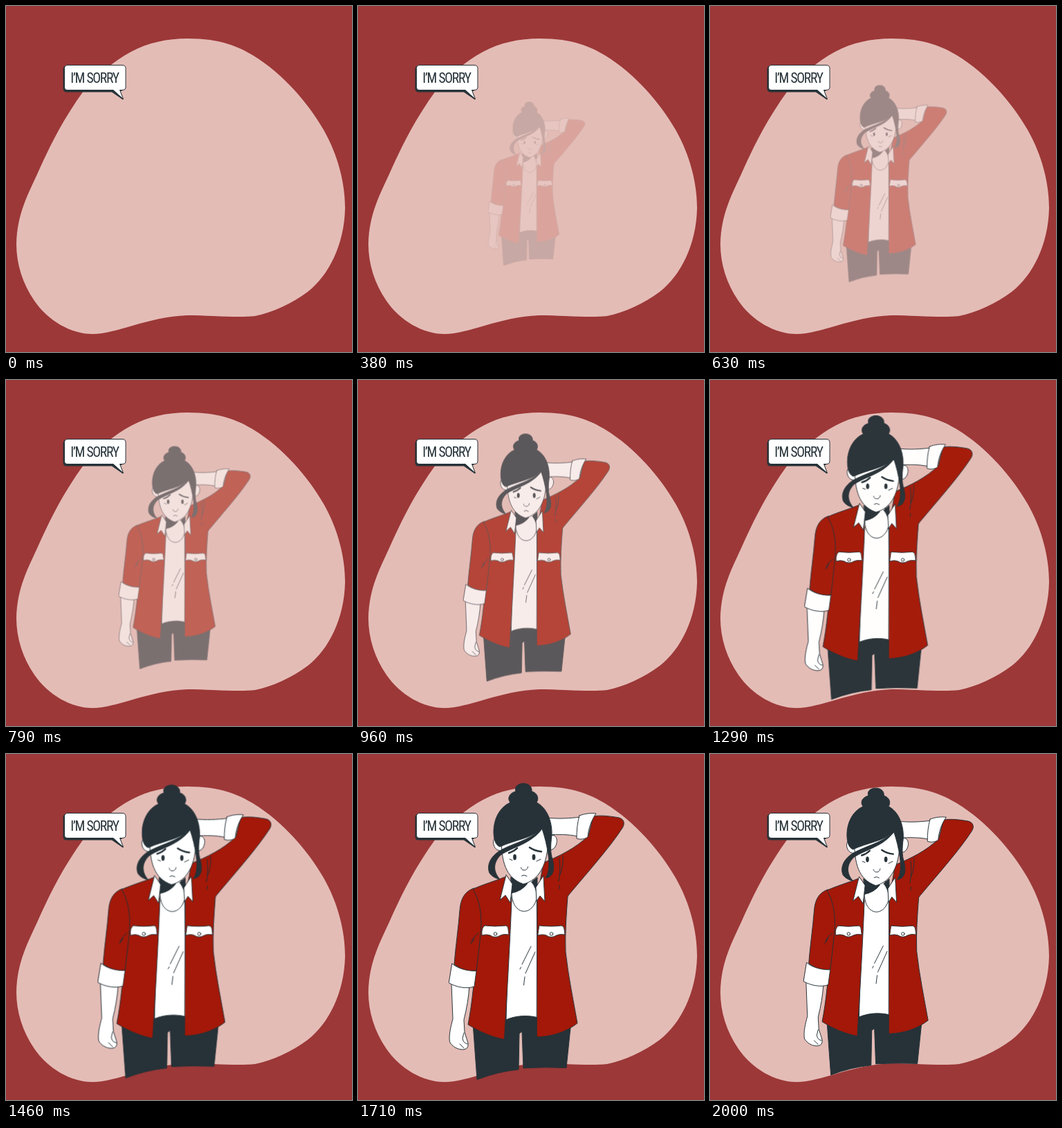
These frames come from a looping animation (500x500 px, 2.04 s). An HTML page:

```html
<!DOCTYPE html>
<html lang="en">
<head>
<meta charset="utf-8">
<title>I'm sorry</title>
<style>
  html, body { margin: 0; width: 100%; height: 100%; overflow: hidden; background: #9c3838; }
  svg { display: block; width: 100vw; height: 100vh; }
  text {
    font: 19.5px "Roboto Condensed", "Open Sans Condensed", Roboto, "Open Sans", sans-serif;
    font-stretch: 75%;
    letter-spacing: -1.2px;
    text-anchor: middle;
  }
  #woman {
    transform-origin: 258px 257px;
    animation: zoom 2s cubic-bezier(.36, -.01, .5, 1.38) both paused;
    stroke: #263238;
    stroke-width: 1;
    stroke-linejoin: round;
    stroke-linecap: round;
  }
  @keyframes zoom {
    from { opacity: 0; transform: scale(.4845); }
    to { opacity: 1; transform: scale(.969); }
  }
  .red { fill: #a31808; }
  .white { fill: #fff; }
  .dark { fill: #263238; }
  .line { fill: none; }
</style>
</head>
<body>
<svg viewBox="0 0 500 500">
  <path fill="#e4bcb6" d="M262 47C312 47 336 59 358 72C400 98 436 139 459 179C480 216 490 256 490 292C489 345 466 390 436 413C413 430 385 443 360 448C335 451 295 447 262 447C205 449 160 474 125 474C94 474 61 455 41 426C24 401 15 373 15 344C16 300 32 272 46 241C65 199 83 163 112 123C130 101 155 80 181 66C205 53 233 47 262 47Z"/>

  <!-- speech bubble -->
  <g stroke="#263238" stroke-linejoin="round">
    <path class="dark" d="M87 87H168Q172 87 172 91V120L165 123L169 135L153 124H87Q83 124 83 119V91Q83 87 87 87Z"/>
    <path class="white" d="M89 85.500H168Q173 85.500 173 90.500V117Q173 121.500 168 121.500H164.500L169.500 134.500L155 121.500H89Q84.500 121.500 84.500 117V90.500Q84.500 85.500 89 85.500Z"/>
  </g>
  <text class="dark" x="128" y="110.500">I’M SORRY</text>

  <g id="woman">
    <!-- trousers -->
    <path class="dark" d="M166 388L172 470.500Q202 459 232 456L233 404L237 401L239 454Q270 452 301 453.500L308 386L258 376H215Z"/>

    <!-- top and neck -->
    <path class="white" d="M222 184L258 182L260 381C246 377 228 378 214 384L219 215Z"/>
    <path class="dark" d="M221 178L245 187Q237 198 222 201Z"/>
    <path class="dark" d="M251 185L259 178V207Q258 194 251 185Z"/>
    <path class="line" d="M222 201C223 235 254 236 259 205"/>
    <path class="line" d="M250 278L237 304M235.500 308L234 311M256 286L242 317M241 322L239.500 334"/>

    <!-- raised arm and jacket -->
    <path class="white" d="M272 92C290 94 305 93 322 91L318 119C304 116 290 116 274 117Z"/>
    <path class="red" d="M259 208L268 157C290 148 315 136 333 118L340 90C351 88 366 90 377 92C385 94 386 101 382 107C363 136 336 166 305 203L303 206C301 232 299 260 300 286C304 322 311 355 317 389C304 399 286 408 258.500 409Z"/>
    <path class="white" d="M320 89C328 86 336 85 344 86C337 96 333 108 332 120C328 123 321 124 316 122C316 110 317 99 320 89Z"/>
    <path class="red" d="M214 177C200 183 182 188 166 195C174 240 171 330 159 391C173 400 192 409 211.500 412.500C215 350 219 285 222 211Z"/>
    <path class="line" d="M291 151Q293 169 290 184M296 147Q297 162 292 174M291 190V195"/>
    <path class="white" d="M183 248Q198 250 214 248Q217 249 217 253L218 261Q210 260 206 262Q198 267 191 262Q186 260 179 262Q178 251 183 248Z"/>
    <path class="white" d="M262 248Q279 250 294 248Q298 249 298 253L299 261Q291 260 287 262Q279 267 272 262Q267 260 260 262Z"/>
    <circle class="white" cx="198.500" cy="260" r="2.300"/>
    <circle class="white" cx="279.500" cy="260" r="2.300"/>

    <!-- lowered arm -->
    <path class="white" d="M135 332L137 383C134 394 131 406 132.500 416C136 423 145 428 153 427Q160 426 159 418L154 402L153 384C157 368 160 352 161 334Z"/>
    <path class="line" d="M153 403L151 411Q152 418 158 419M147 419L153 425"/>
    <path class="red" d="M167 194C153 199 148 211 147 226C145 252 141 278 139 304Q154 316 171 313C174 290 177 264 178 246C178 222 173 207 167 197Z"/>
    <path class="line" d="M174 259Q166 264 163 274M168 266L165 272"/>
    <path class="white" d="M136 303C144 310 158 314 171 313.500L168 336C157 340 142 337 131.500 331Z"/>

    <!-- collar -->
    <path class="white" d="M214 175L205 211L213 204L220 215L223 188Z"/>
    <path class="white" d="M268 176L270 213L263 205L258 213L257 193Z"/>

    <!-- head -->
    <path class="white" d="M207 122C199 117 194 123 196 131C198 138 203 141 209 139Z"/>
    <path class="white" d="M276 119C283 114 289 120 287 129C285 137 280 140 274 138Z"/>
    <path class="white" d="M207 120C207 155 213 179 239 188C262 182 274 160 275 122L262 102Z"/>
    <path class="dark" d="M228 54C225 47 232 42.500 239 42.500C246 42.500 252 47 251 54C259 56 262 64 258 70C272 77 281 96 280 118C278 133 278 143 281 152C285 167 282 178 271 179C276 172 277 160 275 146C273 132 270 120 266 108C250 122 227 124 205 134C199 132 196 124 196 112C196 95 204 77 220 70C215 64 219 56 228 54Z"/>
    <path class="dark" d="M266 108C246 126 222 129 203 141C190 150 186 162 190 172Q195 179 205 181C196 171 194 158 206 146C224 134 250 130 266 108Z"/>
    <g class="line">
      <path stroke-width="2.500" d="M218 143Q225 141 230 136M248 135Q255 140 265 141"/>
      <path d="M219 152L223 153.500M258 155L264 152M235.500 164C236 169.500 245 169.500 245.500 163M236.500 176Q240 173.500 244 176.500"/>
    </g>
    <ellipse class="dark" stroke="none" cx="226.500" cy="149" rx="2.400" ry="4.200"/>
    <ellipse class="dark" stroke="none" cx="254" cy="149" rx="2.400" ry="4.200"/>
  </g>
</svg>
<script>
  const LOOP = 2040, STEP = 1000 / 24, FIRST = 7;
  const woman = document.getElementById("woman");

  // The zoom advances in 24 steps a second and stays hidden at first.
  function draw() {
    const step = Math.floor((performance.now() % LOOP + 4) / STEP);
    woman.style.visibility = step < FIRST || step > 48 ? "hidden" : "visible";
    woman.style.animationDelay = -(step + .5) * STEP + "ms";
    requestAnimationFrame(draw);
  }
  draw();
</script>
</body>
</html>
```
